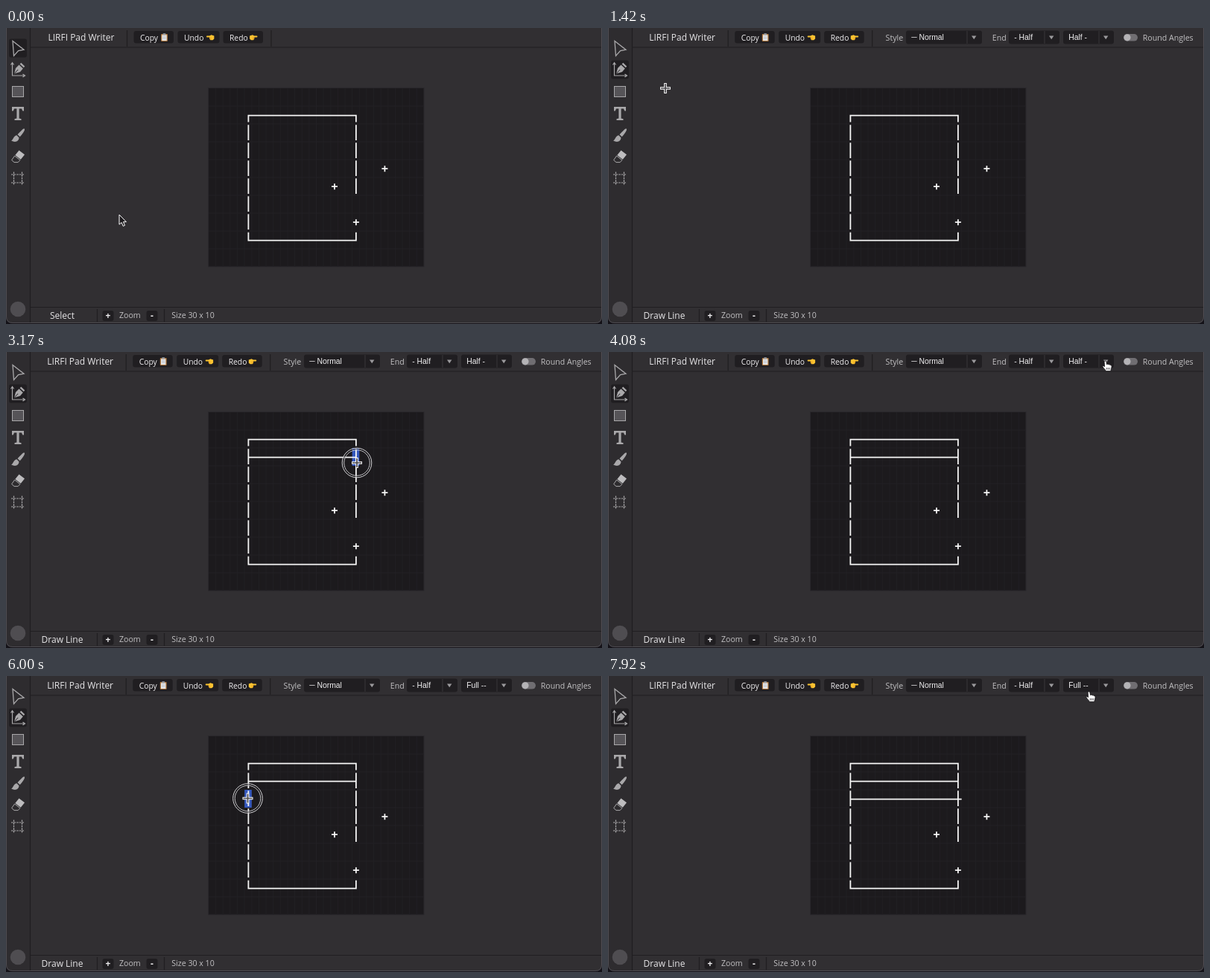
Write an HTML page that moves like this. It is 800x398 px and loops after 8000 ms.

```html
<!DOCTYPE html>
<html lang="en">
<head>
<meta charset="utf-8">
<title>Box drawing demo</title>
<style>
html, body { margin: 0; width: 100%; height: 100%; overflow: hidden; background: #312f32; }
svg { display: block; width: 800px; height: 398px; }
text { font-family: "Open Sans", sans-serif; font-size: 10.6px; fill: #c2c1c3; white-space: pre; }
.title { font-size: 12px; fill: #e6e5e7; }
.label { font-size: 10.3px; fill: #f0eff1; }
.sign { font-size: 12px; font-weight: 700; fill: #f0eff1; }
.value { font-family: "Liberation Sans", Arial, sans-serif; font-size: 10.4px; fill: #f0eff1; }
.item { font-family: Inter, sans-serif; font-size: 10.4px; fill: #f4f4f5; }
.dark { fill: #201e21; }
.rule { stroke: #201e21; stroke-width: 1.2; fill: none; }
.icon { fill: #a9a8aa; }
.ink { stroke: #f6f6f6; stroke-width: 1.8; fill: none; }
#menu { filter: drop-shadow(0 3px 6px rgba(0, 0, 0, .4)); }
</style>
</head>
<body>
<svg id="stage" viewBox="0 0 800 398">
  <rect width="800" height="398" fill="#312f32"/>
  <rect width="32" height="398" fill="#2e2c2f"/>
  <path class="rule" d="M32.5 0V397M32 26H800M32 375.5H800M122.5 378V395M212.5 378V395"/>

  <rect id="tool" class="dark" x="4" width="24" height="25" rx="3"/>
  <g class="icon">
    <path d="M9 17.5L24 29.2L16.6 30.6L10.5 37.5Z" fill="none" stroke="#a9a8aa" stroke-width="1.3"/>
    <path d="M8.5 47V64H25M6.5 49.5L8.5 46.5L10.5 49.5M22.5 62L25.5 64L22.5 66" fill="none" stroke="#a9a8aa" stroke-width="1.2"/>
    <path d="M11 61.5L13 54L17.5 49.5L22.8 54.5L19 59Z"/>
    <path d="M18.6 48.4L20.3 46.7L25.2 51.4L23.8 53.3Z"/>
    <path d="M11 61.5L16.2 56" stroke="#201e21"/>
    <rect x="8.5" y="78.5" width="15" height="14" fill="#565458" stroke="#a9a8aa"/>
    <path d="M8 106H24V111.5H22.3L21 108.5H17.6V121.5L20.5 122.3V124H11.5V122.3L14.4 121.5V108.5H11L9.7 111.5H8Z"/>
    <path d="M24.6 135.4C26 136.6 24 140 18.7 146.3L15.5 143.2C20.5 138 23.6 134.5 24.6 135.4ZM14.4 144.3L17.5 147.6C17 153.5 11.5 154 7 151.5C10 150.5 9.5 145.5 14.4 144.3Z"/>
    <path d="M17.5 164.5L25 170.3L19.8 176.8L12.3 171Z" fill="#bdbcbe"/>
    <path d="M11.6 172L18.9 177.6L16.2 180.6H11L7.6 177.6Z" fill="none" stroke="#a9a8aa"/>
    <path d="M10.5 193.5V211.5M21.5 193.5V211.5M7 197H25M7 208H25" fill="none" stroke="#a9a8aa" stroke-width="1.2" stroke-dasharray="2.6 1"/>
  </g>
  <circle cx="16" cy="378" r="10.3" fill="#4f4d51"/>

  <g id="main">
    <text class="title" x="56.5" y="17">LIRFI Pad Writer</text>
    <path class="rule" d="M162.5 3V25M356 3V25"/>
    <g id="buttons"></g>
  </g>

  <g id="options">
    <text x="372.6" y="16.5">Style</text>
    <text x="515.8" y="16.5">End</text>
    <g id="selects"></g>
    <rect x="692" y="8" width="19" height="9.6" rx="4.8" fill="#706e72"/>
    <circle cx="697" cy="12.8" r="4.6" fill="#b4b3b6"/>
    <text x="717.8" y="16.5">Round Angles</text>
  </g>

  <text id="mode" class="title" x="75.5" y="391" text-anchor="middle"></text>
  <g id="zoom"></g>
  <text x="152" y="390">Zoom</text>
  <text x="222.3" y="390">Size 30 x 10</text>

  <rect x="271.5" y="80.5" width="289.5" height="240.5" fill="#1c1a1d" stroke="#2a282c"/>
  <path id="grid" stroke="#222024" fill="none"/>
  <rect id="cell" width="9.63" height="24" fill="#3558bd"/>
  <path id="box" class="ink"/>
  <path id="lineA" class="ink"/>
  <path id="lineB" class="ink"/>

  <path d="M0 388Q0 397 9 397H791Q800 397 800 388V398H0Z" fill="#141218"/>
  <path d="M.5 0V388Q.5 396.5 9 396.5H791Q799.5 396.5 799.5 388V0" fill="none" stroke="#535156" stroke-width=".9"/>

  <g id="menu">
    <rect x="604.5" y="-8" width="68" height="123.5" rx="5" fill="#201e23" stroke="#4d4b50"/>
    <rect id="pick" x="608" width="60.5" height="18" rx="4" fill="#1b54cc"/>
    <path d="M612 13.5L614.8 16.6L619.6 8.8" stroke="#f4f4f5" stroke-width="1.5" fill="none"/>
    <g id="items"></g>
    <path d="M630 44.8L637 48.4L630 52Z" fill="#f4f4f5"/>
    <path d="M630.4 63.5L636.4 66.7L630.4 69.9Z" fill="none" stroke="#f4f4f5" stroke-width=".9"/>
  </g>

  <g id="pointer">
    <g id="ring" fill="none" stroke="#d6d5d8">
      <circle r="18.6" stroke="#111013" stroke-opacity=".45" stroke-width="2"/>
      <circle r="19.8" stroke-width="1"/>
      <circle r="17.3" stroke-width=".9"/>
    </g>
    <path id="arrow" d="M0 0V13.2L3.1 10.5L5.2 15.4L7.5 14.4L5.5 9.7H9.4Z" fill="#1d1b1e" stroke="#fff"/>
    <g id="cross" fill="none">
      <path d="M-7 0H7M0 -7V7" stroke="#fff" stroke-width="3.6"/>
      <path d="M-6.1 0H6.1M0 -6.1V6.1" stroke="#4a484c" stroke-width="1.7"/>
    </g>
    <g id="hand" transform="translate(.7 .5)">
      <path d="M-1.6 .6C-1.4 -.9 .9 -.9 1.2 .6L1.8 4.2C3 3.3 4.2 3.8 4.4 4.6C5.4 4 6.5 4.5 6.7 5.2C7.8 4.9 8.5 5.6 8.4 7C8.4 9 7.4 10.4 7.2 13.2H.6C0 11.3 -2.4 9.3 -3.7 7.4C-4.2 6 -2.5 5.6 -1.2 7.2Z" fill="#fff" stroke="#161417" stroke-width=".9"/>
      <path d="M1.6 8.5V11.3M3.6 8.5V11.3M5.6 8.5V11.3" stroke="#161417" stroke-width=".7"/>
    </g>
  </g>
</svg>
<script>
const $ = id => document.getElementById(id);
const show = (id, on) => $(id).style.display = on ? '' : 'none';

// Drawing area: 30 x 10 cells
const X0 = 272, Y0 = 81, W = 289 / 30, H = 24;
const midX = col => X0 + (col + .5) * W + .4;
const midY = row => Y0 + (row + .5) * H + .6;
const colAt = x => Math.floor((x - X0) / W);
const rowAt = y => Math.floor((y - Y0) / H);

function buildChrome() {
  const clip = `<rect x=".6" y="8" width="8.8" height="10" rx="1" fill="#b37a3f"/>
    <rect x="1.8" y="9.4" width="6.4" height="7.6" fill="#e4e6e8"/>
    <rect x="3" y="7.2" width="4" height="2.2" rx=".8" fill="#9aa0a6"/>
    <path d="M2.8 12H7.2M2.8 14H7.2" stroke="#a9b4bf" stroke-width=".7"/>`;
  const fist = `<rect x="1" y="10.6" width="7" height="2" rx="1" fill="#fcc331"/>
    <path d="M5 11L7.4 9.2L11.4 10.4V14.6L9.6 16.2H6.4L5.2 14.6Z" fill="#fcc331"/>
    <path d="M5.4 13H7.6M5.6 14.6H7.4" stroke="#d98f17" stroke-width=".7"/>`;
  const button = (x, w, label, art, at) =>
    `<rect class="dark" x="${x}" y="4" width="${w}" height="16.5" rx="3"/>
     <text class="label" x="${x + 8.5}" y="16.5">${label}</text>
     <g transform="${at}">${art}</g>`;
  $('buttons').innerHTML =
    button(171.5, 53.5, 'Copy', clip, 'translate(207.5 0)') +
    button(230.5, 56, 'Undo', fist, 'translate(268 0)') +
    button(291.5, 53.5, 'Redo', fist, 'translate(338.5 0) scale(-1 1)');

  const select = (x, w, label, id) =>
    `<rect class="dark" x="${x}" y="3.5" width="${w}" height="18" rx="3"/>
     <path d="M${x + w - 20} 4V21" stroke="#39373b"/>
     <path d="M${x + w - 14} 10.4h6.4l-3.2 4.8z" fill="#9b9a9d"/>
     <text class="value" id="${id}" x="${x + 7.2}" y="16.4">${label}</text>`;
  $('selects').innerHTML = select(400, 102, '─ Normal', 'style') +
    select(538, 68, '- Half', 'start') + select(611, 68, 'Half -', 'end');

  $('items').innerHTML = ['Half -', 'Full --', '-', '-', '-|', '(None)'].map((s, i) =>
    `<text class="item" x="624" y="${16.3 + i * 18.1}">${s}</text>`).join('');

  $('zoom').innerHTML = [[129.5, '+'], [188.5, '-']].map(([x, s]) =>
    `<rect class="dark" x="${x}" y="380" width="15" height="14" rx="3"/>
     <text class="sign" x="${x + 7.5}" y="391" text-anchor="middle">${s}</text>`).join('');
}

function buildBox() {
  let grid = '';
  for (let c = 1; c < 30; c++) grid += `M${X0 + c * W} ${Y0}v240`;
  for (let r = 1; r < 10; r++) grid += `M${X0} ${Y0 + r * H}h289`;
  $('grid').setAttribute('d', grid);

  const left = midX(5), right = midX(20), top = midY(1), low = midY(8);
  let d = `M${left} 126.5V${top}H${right}V126.5M${left} 274.8V${low}H${right}V274.8`;
  const dash = (x, row) => `M${x} ${Y0 + row * H + 1.3}v20.6`;
  for (let row = 2; row < 8; row++) {
    d += dash(left, row);
    if (row < 6) d += dash(right, row);
  }
  for (const [col, row] of [[24, 4], [17, 5], [20, 7]])
    d += `M${midX(col) - 4} ${midY(row) - .4}h8m-4 -4v8`;
  $('box').setAttribute('d', d);
}

const both = p => p * p * (3 - 2 * p);
const easeIn = p => p * p;
const easeOut = p => 1 - (1 - p) * (1 - p);

// step, x, y, easing towards the next key
const FPS = 12, LOOP = 8000;
const keys = [
  [0, 152, 251], [4, 152, 251], [10, 19, 52], [16, 19, 52],
  [17, 77, 81, easeOut], [22, 310, 163], [26, 328, 144], [31, 328, 143],
  [38, 471, 149], [40, 471, 149], [49, 667, 12], [54, 667, 12],
  [59, 662, 29], [61, 662, 29.5, easeIn], [66, 425, 206, easeOut],
  [70, 324.5, 165], [72, 324.5, 164.5], [79, 467.5, 165],
  [80, 469.5, 165], [85, 469.5, 165], [95, 645, 21], [96, 645, 21]
];

function pointerAt(step) {
  let i = 0;
  while (i < keys.length - 2 && keys[i + 1][0] <= step) i++;
  const [s, x, y, ease = both] = keys[i], [s2, x2, y2] = keys[i + 1];
  const p = ease(Math.min(1, (step - s) / (s2 - s)));
  return [x + (x2 - x) * p, y + (y2 - y) * p];
}

function drawLine(id, step, from, to, row, extra) {
  show(id, step >= from);
  const col = colAt(pointerAt(Math.min(step, to))[0]);
  $(id).setAttribute('d', `M${midX(5)} ${midY(row)}H${midX(col) + extra}`);
}

function render(step) {
  const [x, y] = pointerAt(step);
  const drawing = step >= 11;
  const open = step >= 52 && step < 62;
  const pressed = step >= 29 && step < 40 || step >= 71 && step < 81;

  $('main').setAttribute('transform', `translate(${drawing ? -1.3 : 0} 0)`);
  show('options', drawing);
  $('mode').textContent = drawing ? 'Draw Line' : 'Select';
  $('tool').setAttribute('y', drawing ? 43.5 : 14.5);
  $('end').textContent = step < 62 ? 'Half -' : 'Full --';

  show('menu', open);
  $('pick').setAttribute('y', 3.8 + 18.1 * Math.max(0, Math.floor((y - 3.8) / 18.1)));

  const col = colAt(x), row = rowAt(y);
  show('cell', drawing && col >= 0 && col < 30 && row >= 0 && row < 10);
  $('cell').setAttribute('x', X0 + col * W);
  $('cell').setAttribute('y', Y0 + row * H);
  drawLine('lineA', step, 32, 38, 2, 0);
  drawLine('lineB', step, 73, 80, 3, W / 2);

  const hand = x < 32 || y < 26 || open;
  $('pointer').setAttribute('transform', `translate(${x} ${y})`);
  show('hand', hand);
  show('arrow', !hand && !drawing);
  show('cross', !hand && drawing);
  show('ring', pressed);
}

buildChrome();
buildBox();
const begin = performance.now();
function tick() {
  const t = (performance.now() - begin) % LOOP;
  render(Math.min(95, Math.floor((t + 4) * FPS / 1000)));
  requestAnimationFrame(tick);
}
tick();
</script>
</body>
</html>
```
